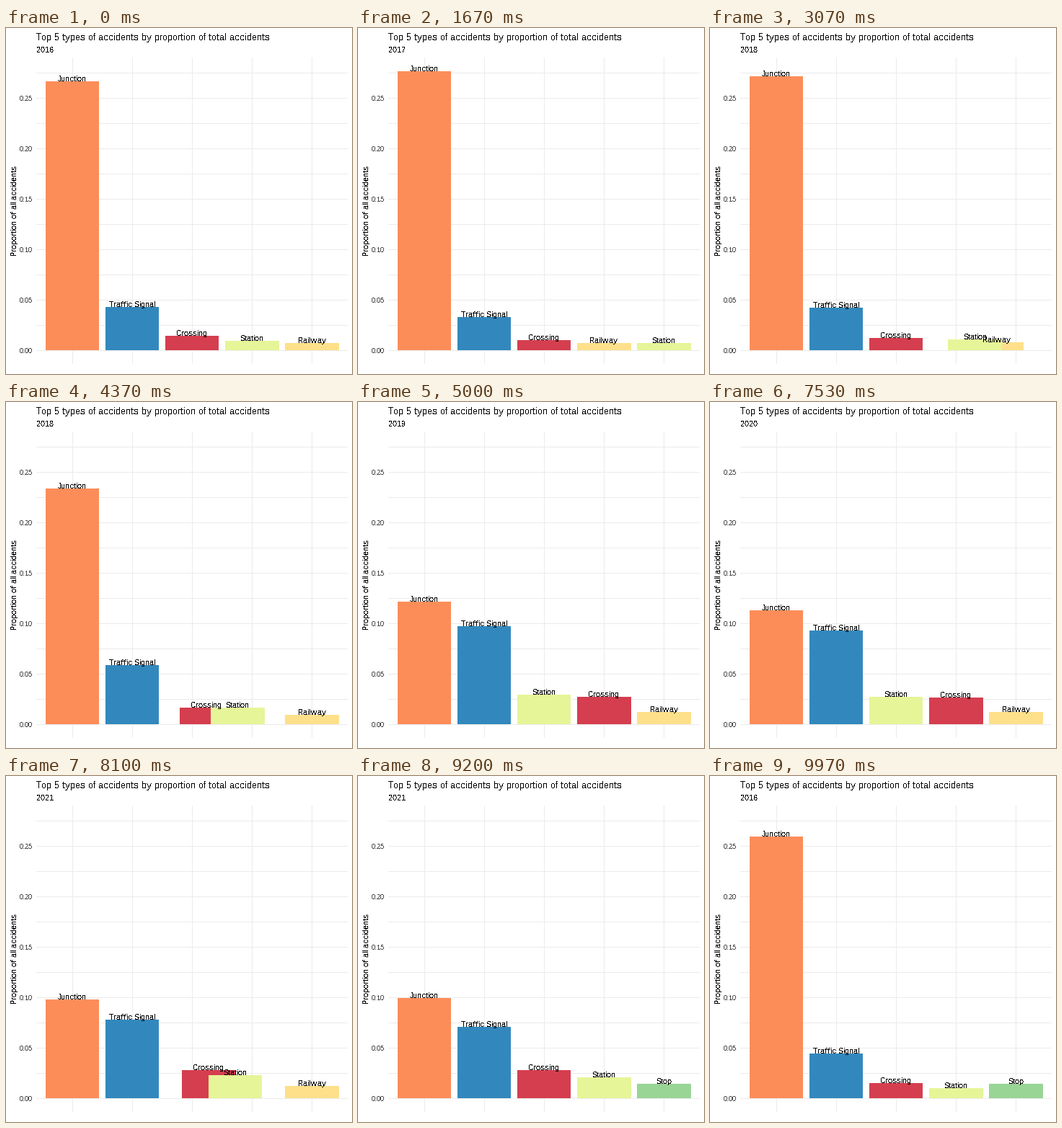
These frames come from a looping animation (480x480 px, 10 s). A matplotlib script:

```python
import math

import matplotlib.pyplot as plt
from matplotlib.animation import FuncAnimation
from matplotlib.patches import Rectangle

plt.rcParams.update({
    "font.family": "Liberation Sans",
    "text.hinting": "native",
    "text.hinting_factor": 1,
    "text.kerning_factor": 6,
})

SIZE, DPI = 480, 72
FRAMES, LOOP_MS = 300, 10000
HOLD, STEP = 25, 50            # frames at rest, frames per year

LEFT, RIGHT, TOP, BOTTOM = 42, 474, 41, 466
ZERO, SCALE = 447, 1400        # pixel row of 0.00, pixels per unit
FIRST, SPACING, BAR_WIDTH = 91.92, 83.08, 0.9 * 83.08

COLORS = {
    "Crossing": "#D53E4F",
    "Junction": "#FC8D59",
    "Railway": "#FEE08B",
    "Station": "#E6F598",
    "Stop": "#99D594",
    "Traffic Signal": "#3288BD",
}

KEYS = ("Junction", "Traffic Signal", "Crossing", "Station", "Railway", "Stop")
DATA = {
    2016: (0.2665, 0.0429, 0.0143, 0.0095, 0.0073, None),
    2017: (0.2764, 0.0329, 0.0100, 0.0070, 0.0074, None),
    2018: (0.2690, 0.0464, 0.0131, 0.0124, 0.0084, None),
    2019: (0.1214, 0.0971, 0.0271, 0.0293, 0.0121, None),
    2020: (0.1130, 0.0930, 0.0264, 0.0274, 0.0121, None),
    2021: (0.0921, 0.0721, 0.0286, 0.0214, None, 0.0143),
}
YEARS = list(DATA)


def ranked(year):
    """Map each type present in a year to (rank, proportion)."""
    found = [(v, k) for k, v in zip(KEYS, DATA[year]) if v is not None]
    found.sort(reverse=True)
    return {k: (i, v) for i, (v, k) in enumerate(found)}


STATES = [ranked(year) for year in YEARS]


def snap(value):
    return math.floor(value + 0.5)


fig = plt.figure(figsize=(SIZE / DPI, SIZE / DPI), dpi=DPI, facecolor="white")
ax = fig.add_axes([0, 0, 1, 1])
ax.set_xlim(0, SIZE)
ax.set_ylim(SIZE, 0)
ax.axis("off")


def box(x, y, w, h, color, z):
    return ax.add_patch(Rectangle((x, y), w, h, facecolor=color, linewidth=0,
                                  antialiased=False, zorder=z))


def label(x, y, text, size, color="black", **kw):
    return ax.text(x, y, text, fontsize=size, color=color, va="baseline",
                   antialiased=False, zorder=5, **kw)


# Grid and vertical axis
for i in range(12):
    y = ZERO - 35 * i
    box(LEFT, y, RIGHT - LEFT, 1, "#EBEBEB", 1)
    if i % 2 == 0:
        label(37, y + 4, f"{i * 0.025:.2f}", 9, "#4D4D4D", ha="right")
for i in range(5):
    box(snap(FIRST + SPACING * i), TOP, 1, BOTTOM - TOP, "#EBEBEB", 1)

label(LEFT, 17, "Top 5 types of accidents by proportion of total accidents", 13)
label(15, (TOP + BOTTOM) / 2, "Proportion of all accidents", 11,
      ha="center", rotation=90, rotation_mode="anchor")
subtitle = label(LEFT, 34, "", 11)

bars = {k: box(0, 0, 0, 0, c, 2) for k, c in COLORS.items()}
names = {k: label(0, 0, k, 11, ha="center") for k in COLORS}


def draw(frame):
    index, step = divmod(frame, STEP)
    following = (index + 1) % len(YEARS)
    p = max(0, step - HOLD) / (STEP - HOLD)
    now, then = STATES[index], STATES[following]
    subtitle.set_text(str(YEARS[index if p < 0.5 else following]))

    for key, bar in bars.items():
        shown = key in now
        bar.set_visible(shown)
        names[key].set_visible(shown)
        if not shown:
            continue
        # A type that drops out stays put until the next year arrives
        (r0, v0), (r1, v1) = now[key], then.get(key, now[key])
        x = FIRST + SPACING * (r0 + (r1 - r0) * p)
        y = snap(ZERO - SCALE * (v0 + (v1 - v0) * p))
        x0, x1 = snap(x - BAR_WIDTH / 2), snap(x + BAR_WIDTH / 2)
        bar.set_bounds(x0, y, x1 - x0, ZERO - y)
        names[key].set_position((x, y))
    return [subtitle, *bars.values(), *names.values()]


anim = FuncAnimation(fig, draw, frames=FRAMES, interval=LOOP_MS / FRAMES,
                     init_func=lambda: draw(0), repeat=True, repeat_delay=0)
plt.show()
```
